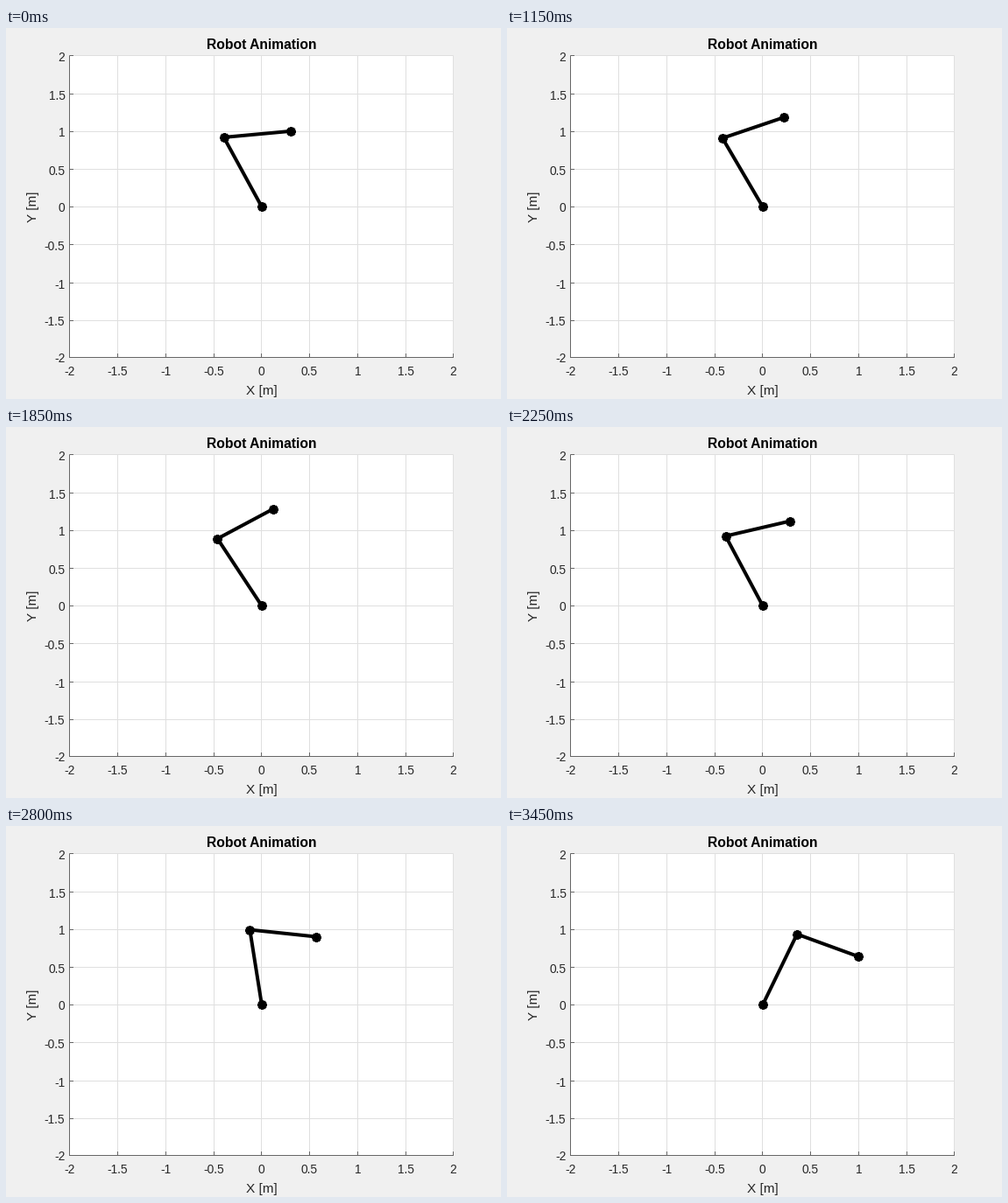
A matplotlib script that plays this animation: 565x424 px, repeating every 3500 ms.

```python
import numpy as np
import matplotlib.pyplot as plt
from matplotlib.animation import FuncAnimation
from matplotlib.patches import Rectangle
from matplotlib.path import Path

W, H, DPI = 565, 424, 64
PX = 72 / DPI                      # points per pixel
X0, Y0 = 291.9, 204.3              # origin in pixels
SX, SY = 109.47, 86.39             # pixels per metre
BOTTOM = 376.5
L1, L2 = 1.0, 0.7                  # link lengths
HOLD, STEPS, TURN = 10, 60, 27
INK, AXIS, GRID = "#262626", "#666666", "#dfdfdf"

plt.rcParams["font.family"] = "Liberation Sans"

fig = plt.figure(figsize=(W / DPI, H / DPI), dpi=DPI, facecolor="#f0f0f0")
ax = fig.add_axes([0, 0, 1, 1])
ax.set_xlim(0, W)
ax.set_ylim(H, 0)
ax.axis("off")


def grid_x(v):
    return np.floor(X0 + SX * v) + 0.5


def grid_y(v):
    return min(np.floor(Y0 + 0.4 - SY * v) + 0.5, BOTTOM)


def line(xs, ys, color, z):
    ax.plot(xs, ys, color=color, lw=PX, zorder=z, snap=False,
            solid_capstyle="butt")


def label(x, y, s, size, **kw):
    kw = {"ha": "center", "va": "baseline", "color": INK, **kw}
    ax.text(x, y, s, fontsize=size * PX, **kw)


def draw_axes():
    left, right = grid_x(-2), grid_x(2)
    top = grid_y(2)
    ax.add_patch(Rectangle((left, top), right - left, BOTTOM - top,
                           fc="white", ec="none", zorder=0, snap=False))
    for v in np.arange(-2, 2.1, 0.5):
        x, y = grid_x(v), grid_y(v)
        line([x, x], [top, BOTTOM], GRID, 1)
        line([left, right], [y, y], GRID, 1)
        line([x, x], [BOTTOM, BOTTOM - 4.5], AXIS, 2)
        line([left, left + 4.5], [y, y], AXIS, 2)
        label(x, 397, f"{v:g}", 13.7)
        label(67.5, y + 6, f"{v:g}", 13.7, ha="right")
    line([left, left], [top, BOTTOM + 0.5], AXIS, 2)
    line([left - 0.5, right + 0.5], [BOTTOM, BOTTOM], AXIS, 2)
    label(291.8, 24, "Robot Animation", 15.6, color="black", weight="bold")
    label(291.8, 419, "X [m]", 15.4)
    label(31, 204, "Y [m]", 15.4, rotation=90, va="center")


# The tip rises along a gentle arc, then sweeps down to the right.
KNOTS = [0, 8, 20, TURN]
RISE_X = np.polyfit(KNOTS, [0.3, 0.277, 0.16, 0.1], 3)
RISE_Y = np.polyfit(KNOTS, [1.0, 1.106, 1.25, 1.3], 3)


def tip(k):
    if k < TURN:
        return np.polyval(RISE_X, k), np.polyval(RISE_Y, k)
    u = k - TURN
    return 0.1 + 0.01802 * u + 0.000274 * u * u, 1.3 - 0.02 * u


def elbow(x, y):
    r = np.hypot(x, y)
    bend = np.arccos((L1**2 + r**2 - L2**2) / (2 * L1 * r))
    a = np.arctan2(y, x) + bend
    return L1 * np.cos(a), L1 * np.sin(a)


def star():
    pts = []
    for a in np.arange(4) * np.pi / 4:
        p = np.array([np.cos(a), np.sin(a)])
        pts += [p, -p]
    return Path(pts, [Path.MOVETO, Path.LINETO] * 4)


draw_axes()
arm, = ax.plot([], [], color="black", lw=4 * PX, marker=star(),
               markersize=11 * PX, markeredgewidth=3.4 * PX,
               markeredgecolor="black", zorder=5)


def update(i):
    end = tip(max(0, i - HOLD + 1))
    joints = np.array([(0, 0), elbow(*end), end])
    arm.set_data(X0 + SX * joints[:, 0], Y0 - SY * joints[:, 1])
    return arm,


anim = FuncAnimation(fig, update, frames=HOLD + STEPS, interval=50,
                     init_func=lambda: update(0), repeat=True, repeat_delay=0)
plt.show()
```
